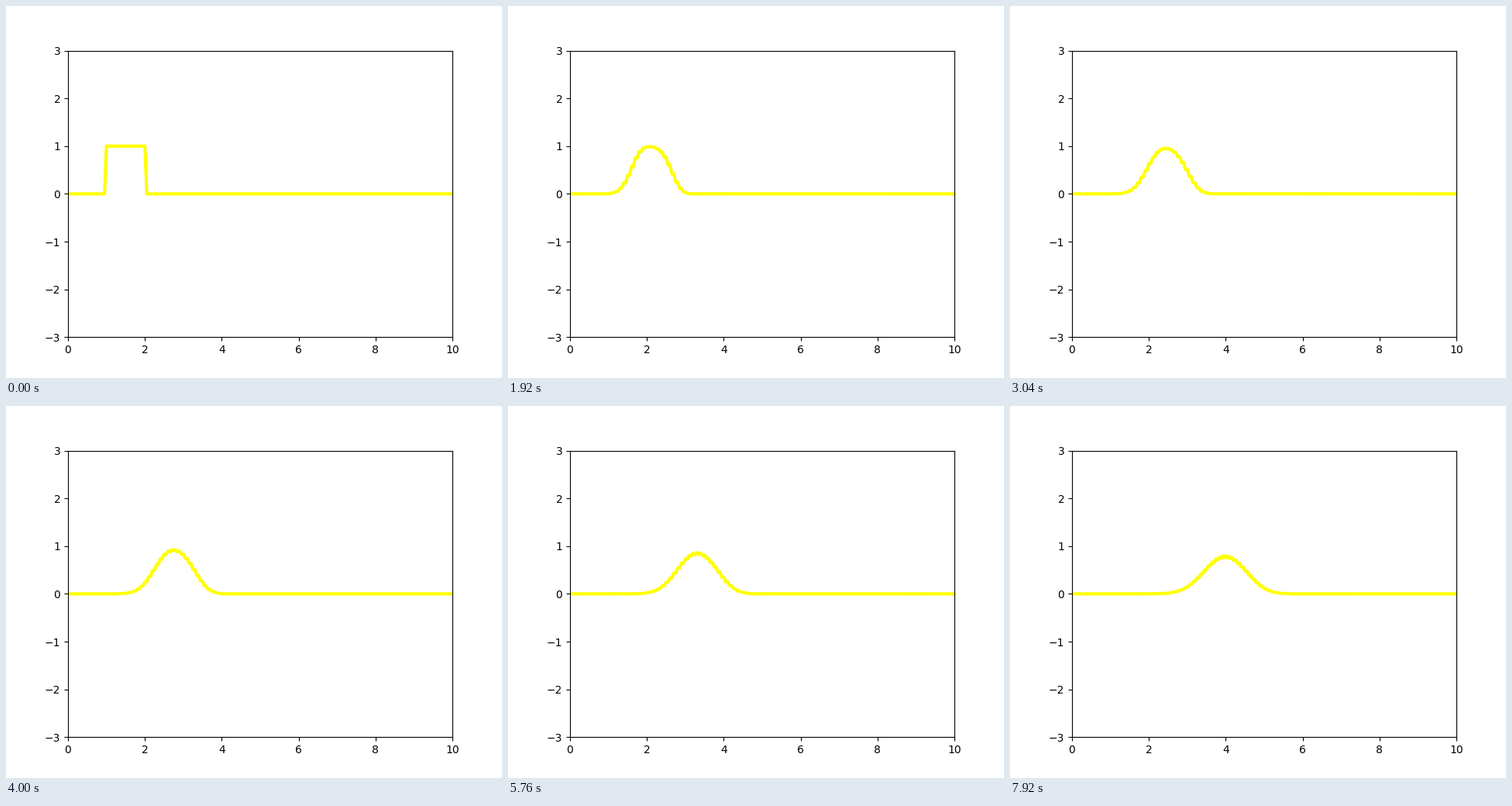
A matplotlib script that plays this animation: 640 by 480 pixels, repeating every 8000 ms.

```python
import numpy as np
import matplotlib.pyplot as plt
from matplotlib.animation import FuncAnimation

FRAMES, INTERVAL = 100, 80
CELLS, LENGTH = 200, 10
COURANT = 0.5


def square_pulse():
    u = np.zeros(CELLS + 1)
    u[CELLS // 10:CELLS // 5 + 1] = 1
    return u


def lax_friedrichs(u):
    """Advance linear advection by one time step."""
    new = u.copy()
    left, right = u[:-2], u[2:]
    new[1:-1] = (left + right) / 2 - COURANT / 2 * (right - left)
    return new


x = np.linspace(0, LENGTH, CELLS + 1)
states = [square_pulse()]
for _ in range(FRAMES - 1):
    states.append(lax_friedrichs(states[-1]))

fig, ax = plt.subplots(figsize=(6.4, 4.8), dpi=100)
ax.set_xlim(0, LENGTH)
ax.set_ylim(-3, 3)
line, = ax.plot(x, states[0], color="yellow", lw=3)


def update(frame):
    line.set_ydata(states[frame])
    return line,


anim = FuncAnimation(fig, update, frames=FRAMES, interval=INTERVAL,
                     repeat=True, repeat_delay=0)
plt.show()
```
